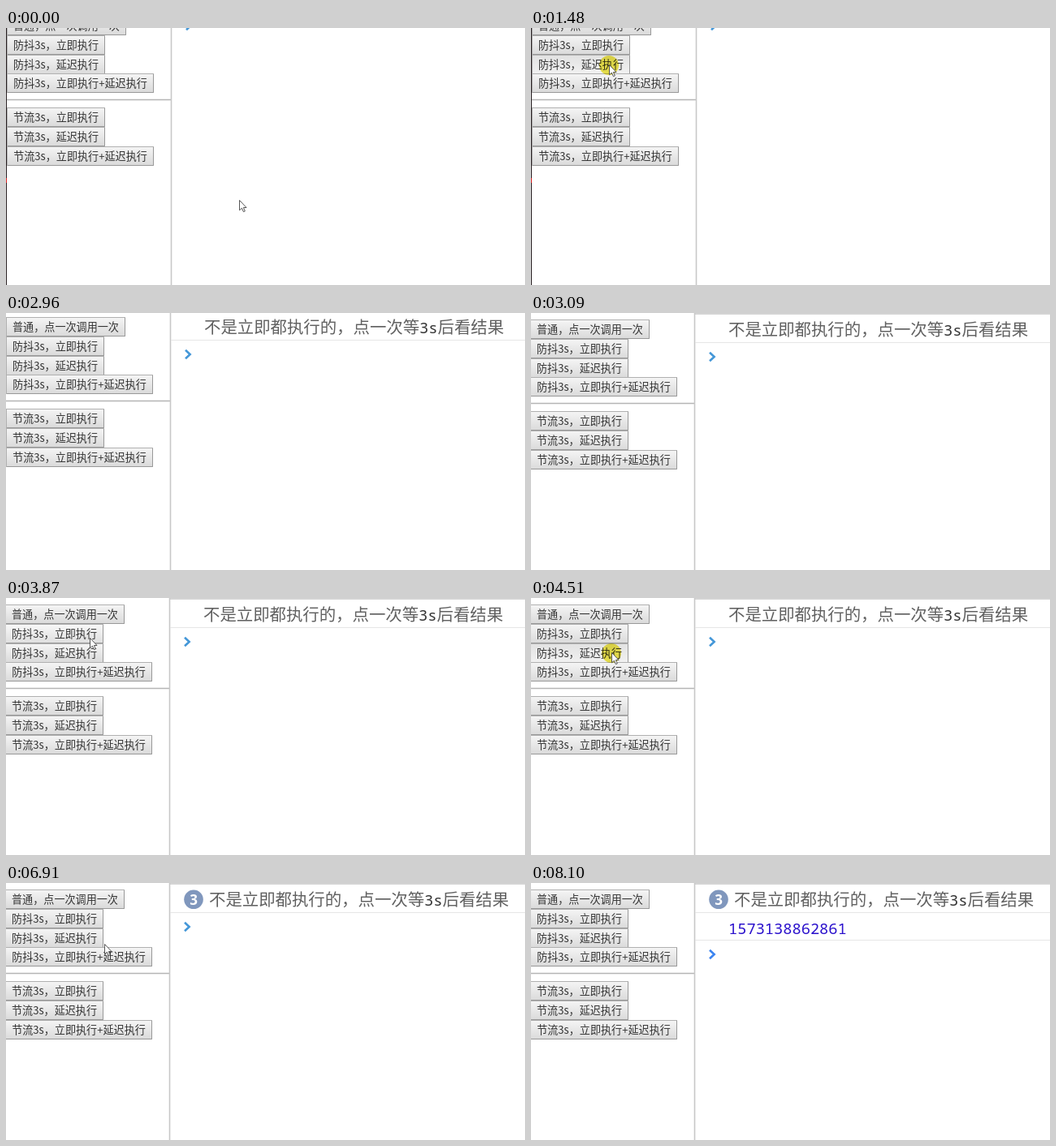
Write an HTML page that moves like this. It is 639 px wide and 317 px high and loops after 8.79 s.

```html
<!DOCTYPE html>
<html lang="zh-CN">
<head>
<meta charset="utf-8">
<style>
  html, body { margin: 0; width: 100%; height: 100%; overflow: hidden; background: #fff; }
  svg { display: block; width: 639px; height: 317px; }
  .btn text { font: 13.1px "Noto Sans CJK SC", "Noto Sans CJK", sans-serif; fill: #333; text-anchor: middle; }
  .msg { font: 300 20.4px "Noto Sans CJK SC", "Noto Sans CJK", sans-serif; fill: #606060; }
  .mono { font: 18.7px "Noto Sans Mono", monospace; }
  .badge { font: bold 17px "Open Sans", sans-serif; fill: #fff; text-anchor: middle; }
  #glow { mix-blend-mode: multiply; }
</style>
</head>
<body>
<svg viewBox="0 0 639 317">
  <defs>
    <linearGradient id="up" x2="0" y2="1"><stop stop-color="#f5f5f5"/><stop offset="1" stop-color="#dadada"/></linearGradient>
    <linearGradient id="over" x2="0" y2="1"><stop stop-color="#f8f8f8"/><stop offset="1" stop-color="#dfdfdf"/></linearGradient>
    <linearGradient id="down" x2="0" y2="1"><stop stop-color="#e2e2e2"/><stop offset="1" stop-color="#f1f1f1"/></linearGradient>
  </defs>
  <g id="page">
    <path d="M-1.5 -10V350" stroke="#2b2325"/>
    <path d="M-1.5 208v6" stroke="#d22"/>
    <path d="M-1 111.5H201" stroke="#b5b5b5" stroke-width="1.5"/>
    <path d="M201.5 -10V350" stroke="#c8c8c8" stroke-width="1.6"/>
    <path d="M202 1H640" stroke="#c6c6c6" stroke-width="1.6"/>
    <g id="buttons"></g>
    <g id="message">
      <path d="M202 36.5H640" stroke="#e6e6e6"/>
      <text id="line" class="msg" y="28">不是立即都执行的，点一次等<tspan class="mono" fill="#333">3s</tspan>后看结果</text>
      <g id="badge">
        <circle cx="231" cy="20.3" r="11.8" fill="#8097bd"/>
        <text id="count" class="badge" x="231" y="26.5"></text>
      </g>
    </g>
    <g id="result">
      <path d="M202 70.5H640" stroke="#e6e6e6"/>
      <text class="mono" x="243" y="63" fill="#2a10cc">1573138862861</text>
    </g>
    <path id="prompt" d="M220 -5.2l5.6 5.2l-5.6 5.2" fill="none" stroke-width="2.6"/>
  </g>
  <circle id="glow" r="12" fill="#f2e94e"/>
  <path id="cursor" d="M.5 .5V12.8L3.4 10.2L5.4 14.7L7.3 13.9L5.4 9.5H9Z" fill="#fff" stroke="#444" stroke-width=".9"/>
</svg>
<script>
const LOOP = 8790;
const $ = id => document.getElementById(id);
const show = (el, on) => el.setAttribute("display", on ? "inline" : "none");
const move = (el, x, y) => el.setAttribute("transform", `translate(${x} ${y})`);
const within = (t, a, b) => t >= a && t < b;

const labels = [
  [8, 146, "普通，点一次调用一次"],
  [32, 120, "防抖3s，立即执行"],
  [56, 120, "防抖3s，延迟执行"],
  [79, 180, "防抖3s，立即执行+延迟执行"],
  [121, 120, "节流3s，立即执行"],
  [145, 120, "节流3s，延迟执行"],
  [169, 180, "节流3s，立即执行+延迟执行"],
];
$("buttons").innerHTML = labels.map(([y, r, s]) => `<g class="btn">
  <rect x="-.5" y="${y + .5}" width="${r}" height="23" stroke="#b0b0b0"/>
  <path d="M0 ${y + 23.5}H${r - .5}V${y + 1}" fill="none" stroke="#999"/>
  <text x="${r / 2 - .5}" y="${y + 17}">${s}</text></g>`).join("");
const faces = [...document.querySelectorAll(".btn rect")];

// Page offset: start, x, y
const pans = [[0, 2, -23], [2630, 1, -12], [2960, 1, -3], [3030, 0, -1], [3090, 0, 0]];

// Pointer strokes: first step, last step, steps, from, to, power
const strokes = [
  [70, 550, 7, 287, 212, 96, 45, .8],
  [2250, 2250, 1, 96, 45, 98, 45, 1],
  [3570, 4040, 7, 112, 5, 99, 67, .6],
  [6910, 7780, 12, 99, 67, 505, 213, 1.17],
  [7840, 8020, 3, 505, 213, 556, 297, 1],
];
const presses = [[1480, 1620], [4420, 4590], [4970, 5120]];

function pointer(t) {
  if (within(t, 2330, 3570) || t >= 8100) return null;
  let pos = [287, 212];
  for (const [a, b, n, x0, y0, x1, y1, pow] of strokes) {
    if (t < a) break;
    const step = n > 1 ? Math.min(n, Math.floor((t - a) / (b - a) * (n - 1) + .02) + 1) : 1;
    const p = (step / n) ** pow;
    pos = [x0 + (x1 - x0) * p, y0 + (y1 - y0) * p];
  }
  return pos.map(Math.round);
}

function draw(t) {
  const [, dx, dy] = pans.filter(p => t >= p[0]).pop();
  move($("page"), dx, dy);

  const pos = pointer(t), pressed = presses.some(([a, b]) => within(t, a, b));
  show($("cursor"), pos);
  show($("glow"), pressed);
  if (pos) {
    move($("cursor"), ...pos);
    move($("glow"), pos[0], pos[1] + 1);
  }
  faces.forEach((face, i) => {
    const [y, r] = labels[i];
    const over = pos && pos[0] - dx < r && within(pos[1] - dy, y, y + 24);
    face.setAttribute("fill", `url(#${!over ? "up" : pressed ? "down" : "over"})`);
  });

  const count = (t >= 1620) + (t >= 4590) + (t >= 5120), done = t >= 8100;
  show($("message"), count > 0);
  show($("badge"), count > 1);
  show($("result"), done);
  $("count").textContent = count;
  $("line").setAttribute("x", count > 1 ? 250 : 243);
  move($("prompt"), 0, done ? 88 : count ? 54 : 20);
  $("prompt").setAttribute("stroke", done ? "#3b84f0" : "#4497d8");
}

let start;
function tick(now) {
  start ??= now;
  draw((now - start) % LOOP);
  requestAnimationFrame(tick);
}
draw(0);
requestAnimationFrame(tick);
</script>
</body>
</html>
```
